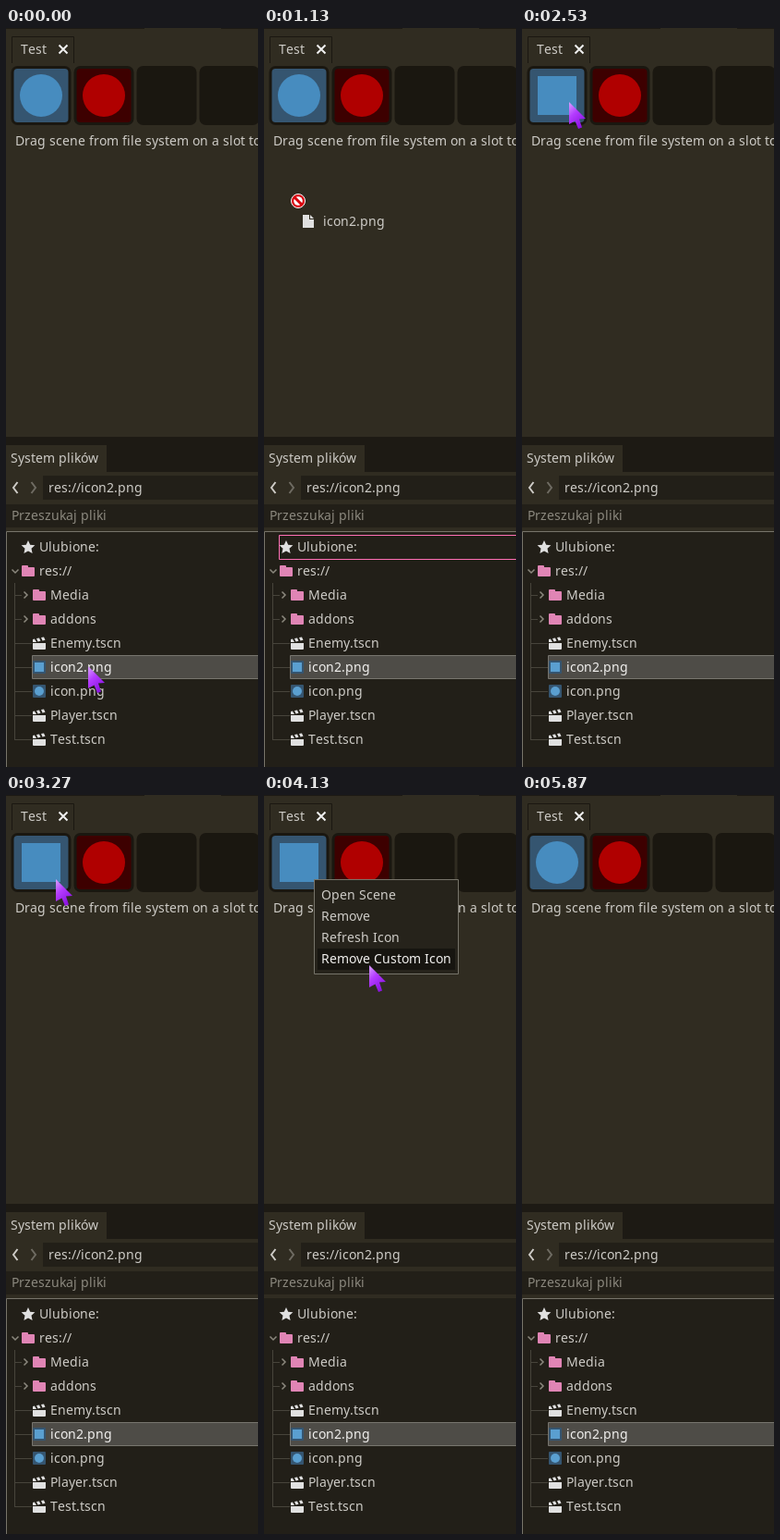
Animation of 273 by 799 pixels, one loop 6590 ms. Source, as an HTML page:

```html
<!DOCTYPE html>
<html lang="pl">
<head>
<meta charset="utf-8">
<title>Scene palette</title>
<style>
  html, body { margin: 0; width: 100%; height: 100%; overflow: hidden; background: #302c21; }
  svg { display: block; }
  text { font: 14px "Noto Sans", "Open Sans", sans-serif; font-kerning: none; fill: #cdcbc6; }
  .dim { fill: #8b887e; }
  .lit { fill: #f0efed; }
  .line { fill: none; stroke: #cdcbc6; stroke-width: 2; }
  .fold { fill: none; stroke: #8b887e; stroke-width: 1.5; }
  .guide { stroke: #47443b; }
</style>
</head>
<body>
<svg width="273" height="799" viewBox="0 0 273 799">
  <defs>
    <linearGradient id="violet" x2=".6" y2="1">
      <stop stop-color="#d9a4ff"/><stop offset=".45" stop-color="#b43cff"/><stop offset="1" stop-color="#8a12e0"/>
    </linearGradient>
    <path id="folder" d="M0 1q0-1 1-1h5q1 0 1 1v1h6q1 0 1 1v8q0 1-1 1H1q-1 0-1-1z" fill="#e085b5"/>
    <path id="clapper" d="M0 6h14v6q0 1-1 1H1q-1 0-1-1zM0 2l2-.4L4 5H0zM4 1l3-.6 1.500 3.400-3 .6zM9 0l3-.6 1.500 3.400-3 .6z" fill="#e0e0e0"/>
    <path id="file" d="M0 0h7v5h5v9H0zM8 0l4 4H8z" fill="#e0e0e0"/>
  </defs>

  <path d="M0 0h150v1H0zM233 0h40v1h-40z" fill="#1d1a14"/>
  <path d="M6.500 38V9.500h67V38" fill="none" stroke="#1a1711"/>
  <text x="16" y="28">Test</text>
  <path d="M57.500 18.500l9 9m0-9l-9 9" class="line" style="stroke:#efefef"/>
  <g id="slots"></g>
  <text x="10" y="127">Drag scene from file system on a slot to</text>

  <path d="M0 442h273v38H109V451H0z" fill="#1d1a14"/>
  <text x="5" y="470">System plików</text>
  <path d="M12.500 491l-4.500 6 4.500 6" class="line"/>
  <path d="M27.500 491l4.500 6-4.500 6" class="line" opacity=".4"/>
  <path d="M40 484h233v26H40zM0 515h273v25H0zM0 544h273v255H0z" fill="#221f18"/>
  <text x="46" y="502">res://icon2.png</text>
  <text x="6" y="532" class="dim">Przeszukaj pliki</text>

  <path id="focus" d="M.5 799V544.500H273" fill="none" stroke="#77746a"/>
  <path d="M28.500 678.500H275v25H28.500z" fill="#4e4c47" stroke="#77756e"/>
  <path d="M24 554l2.200 4.700 5.200.6-3.900 3.500 1.100 5.200-4.600-2.600-4.600 2.600 1.100-5.200-3.900-3.500 5.200-.6z" fill="#e0e0e0"/>
  <text x="36" y="566">Ulubione:</text>
  <path d="M6.500 585.500l3.500 3.500 3.500-3.500" class="fold"/>
  <use href="#folder" x="17" y="581"/>
  <text x="36" y="592">res://</text>
  <g id="tree"></g>
  <path id="drop" d="M274 548.500H16.500v26H274" fill="none" stroke="#ff6fb5"/>

  <g id="menu">
    <path d="M54.500 91.500h156v102h-156z" fill="#26231b" stroke="#77746a"/>
    <rect id="hover" x="58" width="149" height="23" fill="#171510"/>
  </g>
  <g id="ghost"><use href="#file" x="4" y="10"/><text x="26" y="22">icon2.png</text></g>
  <path id="arrow" d="M0 0L18 18 11 18.500 14 27.500 10 29 6.500 20.500 0 24z" fill="url(#violet)"/>
  <g id="forbid">
    <circle cx="-1" cy="-5" r="7.500" fill="#d8000c" stroke="#fff"/>
    <circle cx="-1" cy="-5" r="4.800" fill="#fff"/>
    <path d="M-5-9l8 8" stroke="#d8000c" stroke-width="3"/>
  </g>
</svg>
<script>
const $ = id => document.getElementById(id);
const LOOP = 6590, FPS = 15;

// Spans in ticks, end excluded
const DRAG = [10, 28], CUSTOM = [28, 69], MENU = [50, 69], AWAY = [82, 86], GONE = [88, 99];

// Pointer moves: first tick, last tick, destination
const HOME = { x: 89, y: 690 };
const MOVES = [
  [1, 1, 89, 688], [10, 19, 36, 90], [20, 21, 19, 76], [22, 23, 39, 98], [25, 25, 35, 83],
  [34, 35, 56, 83], [38, 39, 49, 77], [44, 46, 50, 88], [49, 49, 54, 91],
  [56, 58, 118, 189], [61, 62, 114, 184], [78, 78, 107, 153], [79, 81, 19, 308], [86, 86, 15, 766]
];

// Sideways motion settles sooner than vertical motion.
const glide = (from, to, p, power) => Math.round(to - (to - from) * (1 - p) ** power);

function pointer(tick) {
  let { x, y } = HOME;
  for (const [first, last, toX, toY] of MOVES) {
    if (tick < first) break;
    const p = Math.min(1, (tick - first + 1) / (last - first + 1));
    x = glide(x, toX, p, 2);
    y = glide(y, toY, p, 1.1);
  }
  return { x, y };
}

// Scene slots
const slot = (fill, i) => {
  const x = 5.5 + 68 * i;
  return `<rect x="${x}" y="41" width="65" height="64" rx="7" fill="#1a1710"/>` +
    `<rect x="${x + 3}" y="44" width="59" height="58" rx="4" fill="${fill}"/>`;
};
$('slots').innerHTML = ['#355570', '#3d0000', 'none', 'none'].map(slot).join('') +
  '<circle id="plain" cx="38" cy="73" r="23" fill="#478cbf"/>' +
  '<rect id="custom" x="17" y="52" width="42" height="42" fill="#478cbf"/>' +
  '<circle cx="106" cy="73" r="23" fill="#b00000"/>';

// File tree
function icon(name, y) {
  if (!name.endsWith('.png'))
    return `<use href="#${name.endsWith('.tscn') ? 'clapper' : 'folder'}" x="29" y="${y - 6}"/>`;
  const radius = name == 'icon.png' ? 5 : 0;
  return `<rect x="29" y="${y - 7}" width="14" height="14" rx="1" fill="#355570"/>` +
    `<rect x="31" y="${y - 5}" width="10" height="10" rx="${radius}" fill="#5a9fd0"/>`;
}
const names = ['Media', 'addons', 'Enemy.tscn', 'icon2.png', 'icon.png', 'Player.tscn', 'Test.tscn'];
$('tree').innerHTML = '<path d="M9.5 600V769" class="guide"/>' + names.map((name, i) => {
  const y = 613 + 26 * i, folder = !name.includes('.');
  return `<path d="M9 ${y + .5}H${folder ? 17 : 28}" class="guide"/>` +
    (folder ? `<path d="M19.5 ${y - 3.5}l3.5 3.5-3.5 3.5" class="fold"/>` : '') + icon(name, y) +
    `<text x="48" y="${y + 5}" class="${name == 'icon2.png' ? 'lit' : ''}">${name}</text>`;
}).join('');

// Context menu
$('menu').insertAdjacentHTML('beforeend', ['Open Scene', 'Remove', 'Refresh Icon', 'Remove Custom Icon']
  .map((label, i) => `<text x="62" y="${113 + 23 * i}">${label}</text>`).join(''));
const items = $('menu').querySelectorAll('text');

// Glyphs advance by whole pixels, as in the editor's own text.
const pen = document.createElement('canvas').getContext('2d');
pen.font = '14px "Noto Sans", "Open Sans", sans-serif';
for (const text of document.querySelectorAll('text')) {
  let x = +text.getAttribute('x');
  const stops = [...text.textContent].map(char => {
    const left = x;
    x += Math.round(pen.measureText(char).width);
    return left;
  });
  text.setAttribute('x', stops.join(' '));
}

const show = (id, on) => $(id).style.display = on ? '' : 'none';

function draw(tick) {
  const within = ([from, to]) => tick >= from && tick < to;
  const { x, y } = pointer(tick);
  const dragging = within(DRAG), custom = within(CUSTOM), menu = within(MENU);
  const blocked = dragging && y > 105 && y < 544;

  show('arrow', !blocked && !within(AWAY) && !within(GONE));
  show('forbid', blocked);
  show('ghost', dragging);
  for (const id of ['arrow', 'forbid', 'ghost']) $(id).setAttribute('transform', `translate(${x} ${y})`);

  show('drop', dragging && y < 574);
  show('custom', custom);
  show('plain', !custom);
  show('focus', !menu);
  show('menu', menu);

  const row = Math.floor((y - 97) / 23);
  show('hover', items[row]);
  $('hover').setAttribute('y', 97 + 23 * row);
  items.forEach((item, i) => item.setAttribute('class', i == row ? 'lit' : ''));
}

const start = performance.now();
function run() {
  const t = (performance.now() - start) % LOOP;
  draw(Math.floor((t + 4) * FPS / 1000));
  requestAnimationFrame(run);
}
run();
</script>
</body>
</html>
```
